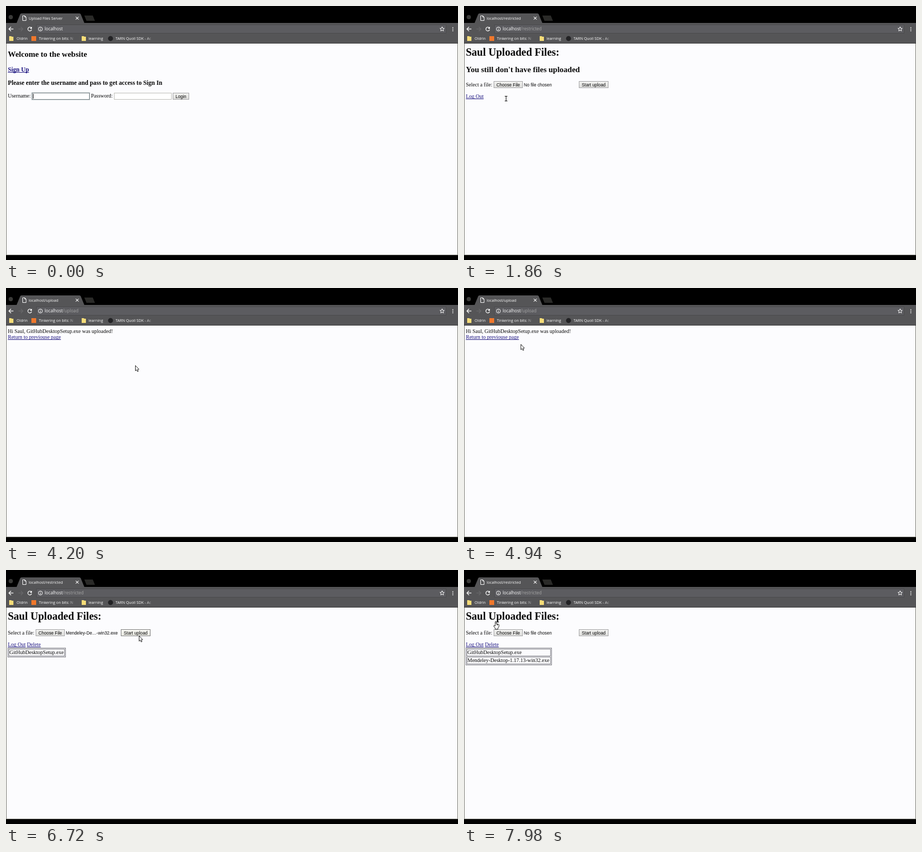
Animation of 854 by 480 pixels, one loop 8000 ms. Source, as an HTML page with a canvas:

```html
<!DOCTYPE html>
<html lang="en">
<head>
<meta charset="utf-8">
<title>Upload Files Server</title>
<style>
html, body { margin: 0; width: 100%; height: 100%; overflow: hidden; background: #000; }
canvas { display: block; width: 854px; height: 480px; }
</style>
</head>
<body>
<canvas id="stage" width="854" height="480"></canvas>
<script>
const c = document.getElementById('stage').getContext('2d');
const LOOP = 8000;
const SERIF = '"Liberation Serif", "Times New Roman", serif';
const SANS = '"Liberation Sans", Arial, sans-serif';
const UI = '"Open Sans", "Noto Sans", sans-serif';
const INK = '#080808', LINK = '#1c1480', BAR = '#555557', LIGHT = '#fcfcfc', EDGE = '#77777f';
const USER = 'Saul';
const FILES = ['GitHubDesktopSetup.exe', 'Mendeley-Desktop-1.17.13-win32.exe'];
const SHORT = ['GitHubDeskt…etup.exe', 'Mendeley-De…-win32.exe'];

// Page shown from each time on: [start, page, number of files]
const pages = [
  [0, 'login', 0], [1460, 'restricted', 0], [4200, 'upload', 1],
  [5240, 'restricted', 1], [6900, 'upload', 2], [7900, 'restricted', 2]
];

// Pointer: [time, x, y, shape]
const moves = [
  [1460, 79, 175, 'beam'], [2400, 79, 175, 'arrow'], [2460, 83, 148, 'arrow'],
  [2620, 83, 148, 'arrow'], [2860, 130, 177, 'arrow'], [3080, 176, 262, 'arrow'],
  [3220, 178, 262, 'arrow'], [3320, 324, 187, 'arrow'], [3600, 326, 190, 'arrow'],
  [4020, 244, 146, 'arrow'], [4300, 244, 146, 'arrow'], [4860, 112, 108, 'arrow'],
  [4940, 107, 106, 'arrow'], [5120, 60, 92, 'hand'], [5240, 60, 92, 'arrow'],
  [5520, 81, 144, 'arrow'], [5720, 81, 144, 'arrow'], [5920, 84, 119, 'arrow'],
  [6050, 84, 119, 'arrow'], [6250, 289, 199, 'arrow'], [6450, 289, 199, 'arrow'],
  [6700, 251, 124, 'arrow'], [7340, 251, 124, 'arrow'], [7700, 60, 97, 'hand'],
  [8000, 60, 97, 'hand']
];

function text(s, x, y, size, { font = SERIF, weight = 400, color = INK, align = 'left' } = {}) {
  c.font = `${weight} ${size}px ${font}`;
  c.fillStyle = color;
  c.textAlign = align;
  c.fillText(s, x, y);
  return c.measureText(s).width;
}

function rect(x, y, w, h, color) {
  c.fillStyle = color;
  c.fillRect(x, y, w, h);
}

function frame(x, y, w, h, color) {
  c.strokeStyle = color;
  c.lineWidth = 1;
  c.strokeRect(x + .5, y + .5, w - 1, h - 1);
}

function poly(points, fill, stroke, close = true) {
  c.beginPath();
  points.forEach(([x, y]) => c.lineTo(x, y));
  if (close) c.closePath();
  if (fill) { c.fillStyle = fill; c.fill(); }
  if (stroke) { c.strokeStyle = stroke; c.stroke(); }
}

function disc(x, y, r, color) {
  c.beginPath();
  c.arc(x, y, r, 0, 7);
  c.fillStyle = color;
  c.fill();
}

function arc(x, y, r, from, to, width) {
  c.beginPath();
  c.arc(x, y, r, from, to);
  c.lineWidth = width;
  c.strokeStyle = LIGHT;
  c.stroke();
}

function link(s, x, y, size = 10, weight = 400) {
  const w = text(s, x, y, size, { weight, color: LINK });
  rect(x, y + 1, w, 1, LINK);
  return w;
}

function button(label, x, y, w, hot) {
  const g = c.createLinearGradient(0, y, 0, y + 13);
  g.addColorStop(0, hot ? '#fafaf6' : '#f4f4f2');
  g.addColorStop(1, hot ? '#e6e6de' : '#dcdcda');
  rect(x, y, w, 13, g);
  frame(x, y, w, 13, hot ? '#7c7c7c' : '#a2a2a4');
  text(label, x + w / 2, y + 9.7, 8.33, { font: SANS, align: 'center' });
}

function field(x, focused, value) {
  rect(x, 164, 109, 13, '#fff');
  frame(x, 164, 109, 13, focused ? '#758084' : '#bcbcb6');
  if (focused) frame(x - 1, 163, 111, 15, '#c9d1d2');
  const w = text(value, x + 2, 173.3, 8.33, { font: SANS });
  if (focused) rect(x + 2 + Math.ceil(w), 166, 1, 9, INK);
}

function arrowIcon(x, dir, color) {
  c.lineWidth = 1.3;
  poly([[x, 39.5], [x - 4 * dir, 43.5], [x, 47.5]], null, color, false);
  poly([[x - 4 * dir, 43.5], [x + 4.5 * dir, 43.5]], null, color, false);
}

function folder(x) {
  poly([[x, 57], [x + 4, 57], [x + 5, 58], [x + 8, 58], [x + 8, 66], [x, 66]], '#f6dc78');
}

function label(s, x, y, size = 7.2, color = LIGHT) {
  return text(s, x, y, size, { font: UI, weight: 500, color });
}

// Bookmark label that fades out at its right edge
function fadeLabel(s, x, end) {
  const g = c.createLinearGradient(end - 16, 0, end, 0);
  g.addColorStop(0, LIGHT);
  g.addColorStop(1, 'rgba(252,252,252,0)');
  label(s, x, 64, 7.2, g);
}

function browser(page) {
  rect(0, 0, 854, 480, '#000');
  poly([[20, 32], [27, 15], [29, 14], [139, 14], [141, 15], [148, 32]], BAR);
  poly([[148, 18], [164, 18], [168, 28], [152, 28]], '#2a2a28');
  disc(9, 21, 4, '#3a3a38');
  rect(0, 32, 854, 39, BAR);
  rect(0, 70, 854, 1, '#3c3c3c');
  rect(57, 35, 775, 17, '#5c5c60');
  frame(57, 35, 775, 17, '#4a4a4c');

  c.lineWidth = 1;
  poly([[31.5, 18.5], [35.5, 18.5], [38, 21], [38, 27.5], [31.5, 27.5]], null, LIGHT);
  poly([[35.5, 18.5], [35.5, 21], [38, 21]], null, LIGHT, false);
  label(page === 'login' ? 'Upload Files Server' : 'localhost/' + page, 43, 25.7, 7.15);
  poly([[132, 20.5], [137, 25.5]], null, LIGHT);
  poly([[137, 20.5], [132, 25.5]], null, LIGHT);

  arrowIcon(9.5, 1, LIGHT);
  arrowIcon(28, -1, '#68686a');
  arc(45, 43.5, 3.6, .3, 5.5, 1.3);
  poly([[49, 39], [49, 43], [45, 43]], LIGHT);
  arc(65, 43.5, 3.8, 0, 7, 1);
  rect(64.5, 43, 1, 3, LIGHT);
  rect(64.5, 41, 1, 1, LIGHT);

  const w = label('localhost', 73, 46.4, 8.2);
  if (page !== 'login') label('/' + page, 73 + w, 46.4, 8.2, '#a6a6a6');

  const star = [];
  for (let i = 0; i < 10; i++) {
    const a = i * Math.PI / 5 - Math.PI / 2, r = i % 2 ? 2 : 4.4;
    star.push([824 + r * Math.cos(a), 43.7 + r * Math.sin(a)]);
  }
  poly(star, null, LIGHT);
  for (const y of [40, 43, 46]) rect(843.5, y, 1.6, 1.6, LIGHT);

  folder(6);
  label('Oldrin', 20, 64);
  rect(48, 57, 9, 9, '#f0782c');
  fadeLabel('Tinkering on bits: N', 62, 133);
  folder(143);
  label('learning', 156, 64);
  disc(197.5, 61.5, 4.7, '#222224');
  fadeLabel('TARN Quoll SDK - Ac', 207, 280);

  rect(0, 71, 854, 400, '#74746c');
  rect(1, 71, 852, 399, '#fcfcfe');
}

function login(t) {
  const pass = t >= 740;
  const typed = USER.toLowerCase().slice(0, Math.max(0, Math.floor((t - 120) / 120)));
  const dots = '•'.repeat(Math.max(0, Math.min(6, Math.floor((t - 780) / 80))));
  text('Welcome to the website', 3.5, 96, 15, { weight: 700 });
  link('Sign Up', 3.5, 124, 11.7, 700);
  text('Please enter the username and pass to get access to Sign In', 3.5, 149, 11.7, { weight: 700 });
  text('Username:', 3.5, 173, 10);
  field(49, !pass, typed);
  text('Password:', 160.5, 173, 10);
  field(204, pass, dots);
  button('Login', 315, 164, 31);
}

function restricted(t, count) {
  const top = count ? 112 : 142;
  const chosen = count === 0 && t >= 3640 ? SHORT[0] : count === 1 && t >= 6400 ? SHORT[1] : 'No file chosen';
  const [px, py] = pointer(t);
  const over = (x, w) => px >= x && px <= x + w && py >= top && py <= top + 13;
  text(USER + ' Uploaded Files:', 3.5, 94, 20, { weight: 700 });
  if (!count) text("You still don't have files uploaded", 3.5, 125, 15, { weight: 700 });
  text('Select a file:', 3.5, top + 9.5, 10);
  button('Choose File', 56, top, 55, over(56, 55));
  text(chosen, 113, top + 9.7, 8.33, { font: SANS });
  button('Start upload', 217, top, 56, over(217, 56));
  const w = link('Log Out', 3.5, top + 32);
  if (!count) return;
  link('Delete', 6 + w, top + 32);
  const width = count === 1 ? 110 : 163;
  frame(3, 147, width, 3 + 15 * count, EDGE);
  for (let i = 0; i < count; i++) {
    frame(5, 149 + 15 * i, width - 4, 14, EDGE);
    text(FILES[i], 6.5, 159 + 15 * i, 10);
  }
}

function upload(count) {
  text(`Hi ${USER}, ${FILES[count - 1]} was uploaded!`, 3.5, 85, 10);
  link('Return to previouse page', 3.5, 96);
}

function pointer(t) {
  if (t < moves[0][0]) return [-50, -50, ''];
  let i = 0;
  while (i < moves.length - 2 && t >= moves[i + 1][0]) i++;
  const [t0, x0, y0, shape] = moves[i], [t1, x1, y1] = moves[i + 1];
  const p = (t - t0) / (t1 - t0), k = p * p * (3 - 2 * p);
  return [x0 + (x1 - x0) * k, y0 + (y1 - y0) * k, shape];
}

function drawPointer(t) {
  const [x, y, shape] = pointer(t);
  if (!shape) return;
  c.save();
  c.translate(Math.round(x), Math.round(y));
  c.lineWidth = .9;
  if (shape === 'beam') {
    rect(0, -5, 1, 10, INK);
    rect(-2, -5, 5, 1, INK);
    rect(-2, 4, 5, 1, INK);
  } else if (shape === 'hand') {
    poly([[-1, 1], [0, 0], [1, 1], [1, 5], [4, 5], [6, 6], [6, 10], [4, 13], [4, 15],
      [-1, 15], [-1, 13], [-4, 9], [-3, 7.5], [-1, 9]], '#fff', INK);
    poly([[3, 5], [3, 7.5]], null, INK);
  } else {
    poly([[.5, .5], [.5, 10.5], [2.7, 8.6], [4.4, 12], [6, 11.2], [4.5, 8], [7.2, 7.6]], '#fff', INK);
  }
  c.restore();
}

function draw(now) {
  const t = now % LOOP;
  const [, page, count] = pages.filter(p => p[0] <= t).pop();
  browser(page);
  if (page === 'login') login(t);
  else if (page === 'upload') upload(count);
  else restricted(t, count);
  drawPointer(t);
}

let start;
function tick(now) {
  start ??= now;
  draw(Math.max(0, now - start));
  requestAnimationFrame(tick);
}
draw(0);
requestAnimationFrame(tick);
</script>
</body>
</html>
```
